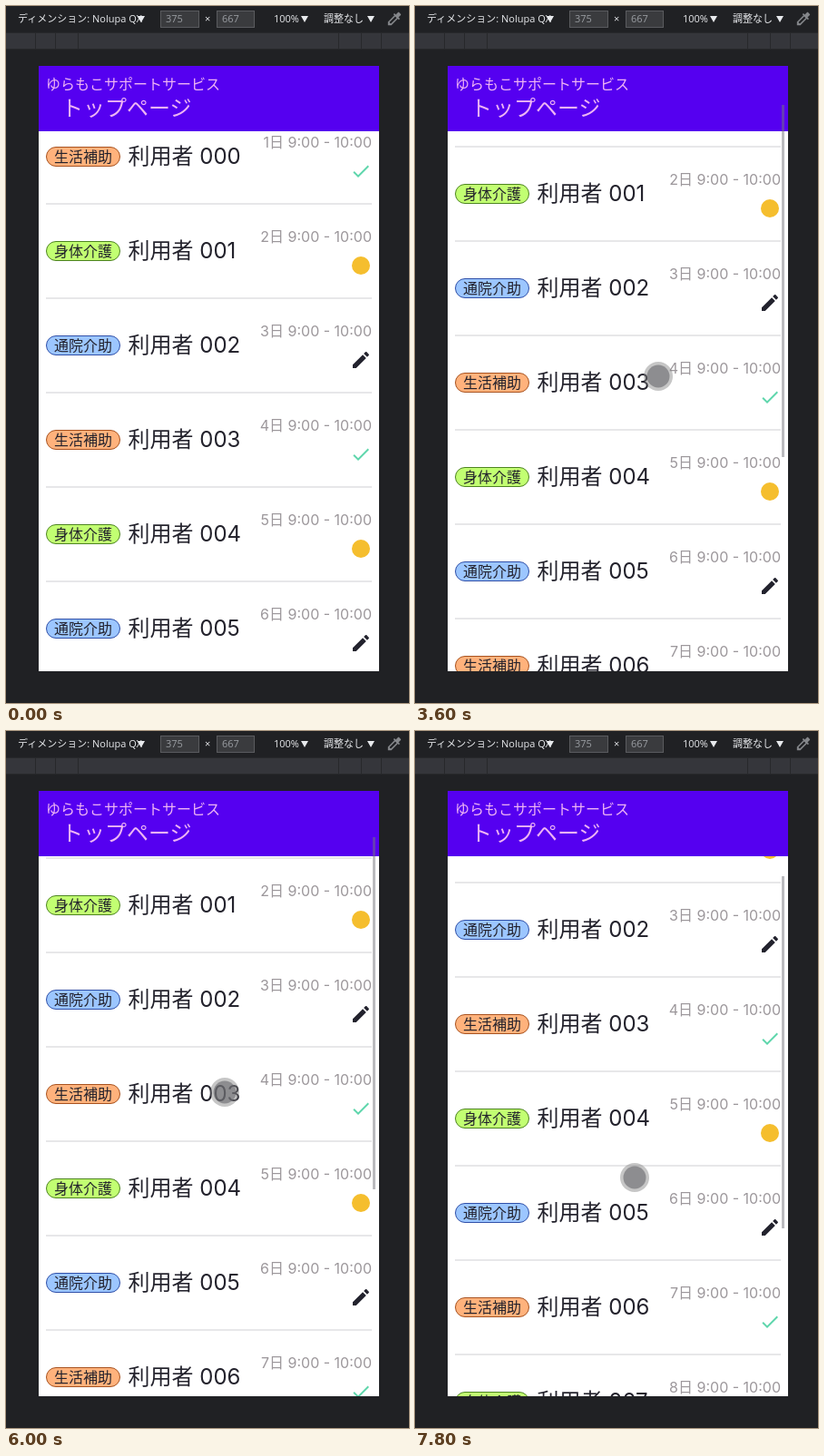
An HTML page for the animation above (8000 ms loop, 444 by 768 pixels).

```html
<!DOCTYPE html>
<html lang="ja">
<head>
<meta charset="utf-8">
<style>
html, body { margin: 0; width: 100%; height: 100%; overflow: hidden; background: #202124; }
svg { display: block; }
text { font-family: Inter, 'Noto Sans CJK JP', sans-serif; white-space: pre; }
.jp { font-family: 'Noto Sans CJK JP', sans-serif; font-weight: 300; }
.bar text { font: 11px 'Open Sans', 'Noto Sans CJK JP', sans-serif; fill: #e8eaed; }
.bar .dim { fill: #9a9da2; }
.field { fill: #3a3b3e; stroke: #5a5b5f; }
.name { font-size: 24px; fill: #23222c; }
.date { font-size: 16px; fill: #9c979b; text-anchor: end; }
.chip { font-size: 16px; fill: #23222c; text-anchor: middle; }
.head { fill: #efb4f4; }
</style>
</head>
<body>
<svg width="444" height="768" viewBox="0 0 444 768">
  <defs>
    <clipPath id="screen"><rect x="36" y="66" width="375" height="667"/></clipPath>
  </defs>
  <rect width="444" height="768" fill="#202124"/>
  <g class="bar">
    <rect y="29" width="444" height="18" fill="#35363b"/>
    <path d="M0 29.5H444M0 47.5H444M32.5 30V47M54.5 30V47M79.5 30V47M366.5 30V47M391.5 30V47M413.5 30V47" stroke="#27282b"/>
    <text x="13" y="18" textLength="">ディメンション: Nolupa QX</text>
    <path d="M145 11h8l-4 7zM325 11h8l-4 7zM398 11h8l-4 7z" fill="#e8eaed"/>
    <rect class="field" x="170.5" y="5.5" width="42" height="18"/>
    <rect class="field" x="232.5" y="5.5" width="41" height="18"/>
    <text class="dim" x="176" y="18">375</text>
    <text x="219" y="18">×</text>
    <text class="dim" x="238" y="18">667</text>
    <text x="295" y="18">100%</text>
    <text x="350" y="18">調整なし</text>
    <path transform="translate(418.4 4.4) scale(.8)" fill="#85878b" d="M20.71 5.63l-2.34-2.34c-.39-.39-1.02-.39-1.41 0l-3.12 3.12-1.93-1.91-1.41 1.41 1.42 1.42L3 16.25V21h4.75l8.92-8.92 1.42 1.42 1.41-1.41-1.92-1.92 3.12-3.12c.4-.4.4-1.03.01-1.42zM6.92 19L5 17.08l8.06-8.06 1.92 1.92L6.92 19z"/>
  </g>
  <g clip-path="url(#screen)">
    <rect x="36" y="66" width="375" height="667" fill="#fff"/>
    <g id="list"></g>
    <rect x="36" y="66" width="375" height="72" fill="#5500f0"/>
    <text class="jp head" x="44" y="92" font-size="16">ゆらもこサポートサービス</text>
    <text class="jp head" x="61" y="121" font-size="24">トップページ</text>
    <rect id="thumb" x="404" width="3" height="388" fill="#77777f" fill-opacity=".5"/>
  </g>
  <g id="touch">
    <circle r="16" fill="#808080" fill-opacity=".45"/>
    <circle r="12.5" fill="#68686c" fill-opacity=".6"/>
  </g>
</svg>
<script>
const $ = id => document.getElementById(id);

const kinds = [
  { label: '生活補助', fill: '#ffb27c', edge: '#a8521f',
    icon: '<path fill="#5fd6ac" d="M9 16.17L4.83 12l-1.42 1.41L9 19 21 7l-1.41-1.41z"/>' },
  { label: '身体介護', fill: '#c2ff72', edge: '#4d8420',
    icon: '<circle cx="12" cy="12" r="10" fill="#f5be2e"/>' },
  { label: '通院介助', fill: '#9cc6ff', edge: '#2f4fa8',
    icon: '<path fill="#23232e" d="M3 17.25V21h3.75L17.81 9.94l-3.75-3.75L3 17.25zM20.71 7.04c.39-.39.39-1.02 0-1.41l-2.34-2.34c-.39-.39-1.02-.39-1.41 0l-1.83 1.83 3.75 3.75 1.83-1.83z"/>' }
];

function row(i) {
  const k = kinds[i % 3];
  return `<g transform="translate(0 ${i * 104})">
    <rect x="44.5" y="155.5" width="81" height="21" rx="10.5" fill="${k.fill}" stroke="${k.edge}"/>
    <text class="jp chip" x="85" y="172">${k.label}</text>
    <text class="name" x="134.5" y="174"><tspan class="jp">利用者</tspan> ${String(i).padStart(3, '0')}</text>
    <text class="date" x="403" y="156">${i + 1}<tspan class="jp">日</tspan> 9:00 - 10:00</text>
    <g transform="translate(379 170)">${k.icon}</g>
    <rect x="44" y="217" width="359" height="2" fill="#e7e7e9"/>
  </g>`;
}
$('list').innerHTML = Array.from({ length: 10 }, (_, i) => row(i)).join('');

// Tracks: [time, value, ...]
const pointer = [[1800, 405, 456], [2200, 330, 402], [2400, 300, 399], [3200, 270, 473],
  [3600, 268, 408], [4200, 238, 233], [5200, 238, 233], [5600, 238, 312],
  [6400, 243, 484], [6600, 244, 503], [7000, 244, 653], [7600, 242, 492]];
const scroll = [[3200, 0], [3600, 63], [4200, 244], [5200, 244], [5600, 162],
  [6400, -6], [7000, -6], [7600, 155]];
const thumbAlpha = [[3200, 0], [3400, 1], [4600, 1], [4800, .25], [5000, 0], [5200, 0], [5400, 1]];

function at(track, t) {
  const n = track.findIndex(k => k[0] > t);
  if (n < 0) return track[track.length - 1].slice(1);
  if (n === 0) return track[0].slice(1);
  const a = track[n - 1], b = track[n], u = (t - a[0]) / (b[0] - a[0]);
  return a.slice(1).map((v, i) => v + (b[i + 1] - v) * u);
}

const start = performance.now();
function draw() {
  // The picture advances five times a second
  const t = Math.floor((performance.now() - start) % 8000 / 200) * 200;
  const s = Math.round(at(scroll, t)[0]);
  const [x, y] = at(pointer, t).map(Math.round);
  $('list').setAttribute('transform', `translate(0 ${-s})`);
  $('thumb').setAttribute('y', Math.round(70 + (s + 6) * .56));
  $('thumb').setAttribute('opacity', at(thumbAlpha, t)[0]);
  $('touch').setAttribute('transform', `translate(${x} ${y})`);
  $('touch').setAttribute('visibility', t < 1800 ? 'hidden' : 'visible');
  requestAnimationFrame(draw);
}
draw();
</script>
</body>
</html>
```
